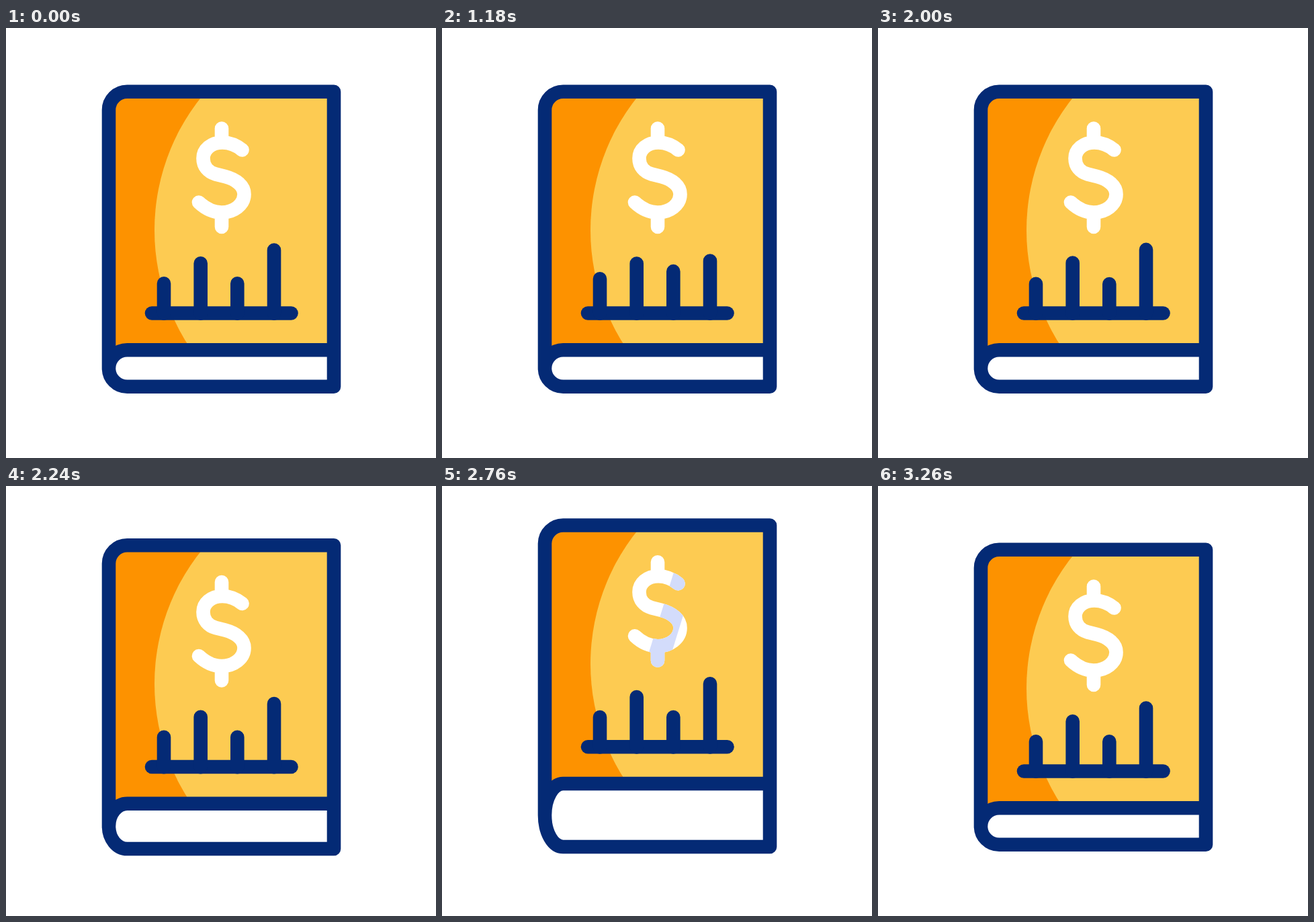
These frames come from a looping animation (640x640 px, 3600 ms). An HTML page:

```html
<!DOCTYPE html>
<html lang="en">
<head>
<meta charset="utf-8">
<title>Finance book</title>
<style>
  html, body { margin: 0; width: 100%; height: 100%; overflow: hidden; background: #fff; }
  svg { display: block; width: 100vw; height: 100vh; }
  .ink { fill: none; stroke: #042a75; stroke-width: 20.6; stroke-linecap: round; stroke-linejoin: round; }
  .sign { fill: none; stroke: #fff; stroke-width: 20.6; stroke-linecap: round; stroke-linejoin: round; }
</style>
</head>
<body>
<svg viewBox="0 0 640 640">
  <defs>
    <path id="dollar" d="M321 149.5V166M321 280V296M351.5 181.5C343 174.5 333 170.5 322 170.5C305 170.5 293.5 181 293.5 194C293.5 206 301 214.5 312 217.5L326 221C343 225.5 354.5 235 354.5 247.5C354.5 263 339 274.5 321 274.5C306 274.5 296 268 287 259.5"/>
    <mask id="signMask" maskUnits="userSpaceOnUse" x="0" y="0" width="640" height="640">
      <use href="#dollar" class="sign"/>
    </mask>
    <clipPath id="coverClip"><path id="coverShape"/></clipPath>
  </defs>
  <path id="pages" fill="#fff"/>
  <g clip-path="url(#coverClip)">
    <rect x="140" y="30" width="360" height="480" fill="#fd9200"/>
    <circle id="light" cx="538" cy="301" r="317" fill="#fdcb52"/>
  </g>
  <g id="art">
    <use href="#dollar" class="sign"/>
    <g mask="url(#signMask)">
      <path id="glint" d="M12 130H46L-13 320H-47Z" fill="#d3dcfb"/>
    </g>
    <path class="ink" d="M217 424.5H424.5"/>
    <path id="bars" class="ink"/>
  </g>
  <path id="outline" class="ink"/>
</svg>
<script>
const LOOP = 3600;
const el = id => document.getElementById(id);

// Tracks are [time, value] pairs, eased in and out between neighbours.
const coverTrack = [[2100, 0], [2650, -42], [3110, 0]];
const baseTrack = [[2060, 0], [2290, 7], [2540, 0], [2690, 0], [2930, 16], [3260, 0]];
const barTimes = [200, 860, 1640, 2060];
const bars = [
  { x: 235, tops: [370, 353.8, 379, 370] },
  { x: 289.7, tops: [340, 348.4, 326, 340] },
  { x: 344.3, tops: [370, 333, 385, 370] },
  { x: 399, tops: [320.3, 353.3, 306, 320.3] }
];
for (const b of bars) b.track = b.tops.map((y, i) => [barTimes[i], y]);

function sample(track, t) {
  if (t <= track[0][0]) return track[0][1];
  for (let i = 1; i < track.length; i++) {
    const [t0, a] = track[i - 1], [t1, b] = track[i];
    if (t < t1) return a + (b - a) * (1 - Math.cos(Math.PI * (t - t0) / (t1 - t0))) / 2;
  }
  return track[track.length - 1][1];
}

function draw(t) {
  const lift = sample(coverTrack, t);
  const top = 94.7 + lift, seam = 479.2 + lift;
  const base = 533.8 + sample(baseTrack, t);
  const mid = (seam + base) / 2, ry = (base - seam) / 2;
  const shoulder = `V${top + 27.3}A27.3 27.3 0 0 1 180.3 ${top}H488`;
  const upperArc = `A27.3 ${ry} 0 0 1 180.3 ${seam}H488`;
  const lowerArc = `A27.3 ${ry} 0 0 0 180.3 ${base}H488`;

  el('coverShape').setAttribute('d', `M153 ${mid}${shoulder}V${seam}H180.3A27.3 ${ry} 0 0 0 153 ${mid}Z`);
  el('pages').setAttribute('d', `M153 ${mid}${upperArc}V${base}H180.3A27.3 ${ry} 0 0 1 153 ${mid}Z`);
  el('outline').setAttribute('d', `M153 ${mid}${shoulder}V${base}M153 ${mid}${upperArc}M153 ${mid}${lowerArc}`);

  const shift = `translate(0 ${lift})`;
  el('light').setAttribute('transform', shift);
  el('art').setAttribute('transform', shift);
  el('bars').setAttribute('d', bars.map(b => `M${b.x} 424.7V${sample(b.track, t) + 10.3}`).join(''));

  const sweep = t > 2590 && t < 2880;
  el('glint').setAttribute('visibility', sweep ? 'visible' : 'hidden');
  el('glint').setAttribute('transform', `translate(${230 + (t - 2590) * 0.665} 0)`);
}

const start = performance.now();
function tick() {
  draw((performance.now() - start) % LOOP);
  requestAnimationFrame(tick);
}
draw(0);
requestAnimationFrame(tick);
</script>
</body>
</html>
```
